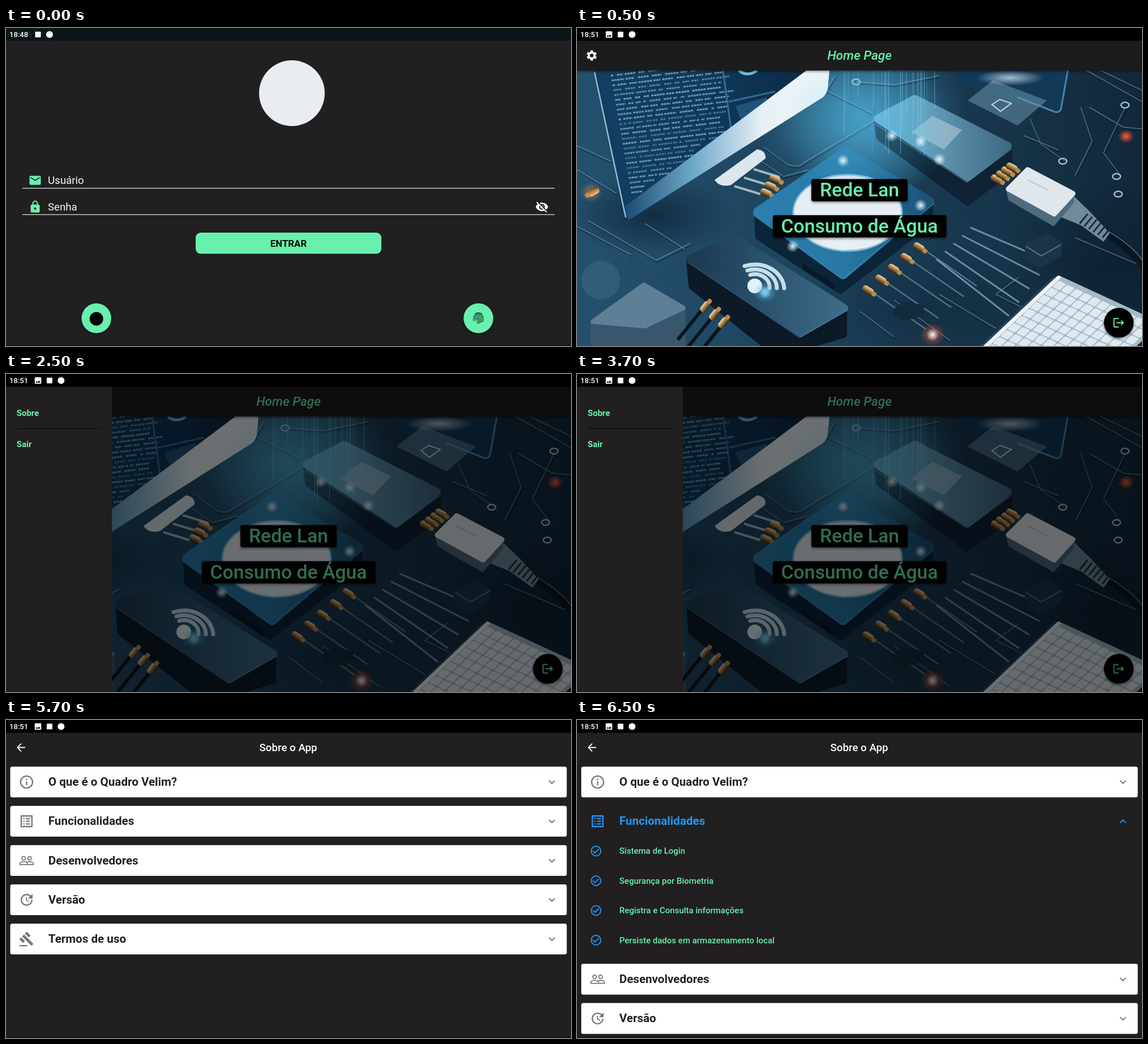
Write an HTML page that moves like this. It is 998x561 px and loops after 8 s.

```html
<!DOCTYPE html>
<html lang="pt">
<head>
<meta charset="utf-8">
<style>
html, body { margin: 0; width: 100%; height: 100%; overflow: hidden; background: #211f20; }
svg { display: block; width: 100%; height: 100%; }
text { font-family: Roboto, sans-serif; }
</style>
</head>
<body>
<svg id="stage" viewBox="0 0 998 561"></svg>
<script>
const GREEN = '#69f0ae', BLUE = '#2196f3', DARK = '#211f20';
const RING = 'M12 2C6.48 2 2 6.48 2 12s4.48 10 10 10 10-4.48 10-10S17.52 2 12 2zm0 18c-4.41 0-8-3.59-8-8s3.59-8 8-8 8 3.59 8 8-3.59 8-8 8z';
const ICONS = {
  mail: 'M20 4H4c-1.1 0-1.99.9-1.99 2L2 18c0 1.1.9 2 2 2h16c1.1 0 2-.9 2-2V6c0-1.1-.9-2-2-2zm0 4l-8 5-8-5V6l8 5 8-5v2z',
  lock: 'M18 8h-1V6c0-2.76-2.24-5-5-5S7 3.24 7 6v2H6c-1.1 0-2 .9-2 2v10c0 1.1.9 2 2 2h12c1.1 0 2-.9 2-2V10c0-1.1-.9-2-2-2zm-6 9c-1.1 0-2-.9-2-2s.9-2 2-2 2 .9 2 2-.9 2-2 2zm3.1-9H8.9V6c0-1.71 1.39-3.1 3.1-3.1 1.71 0 3.1 1.39 3.1 3.1v2z',
  hidden: 'M12 7c2.76 0 5 2.24 5 5 0 .65-.13 1.26-.36 1.83l2.92 2.92c1.51-1.26 2.7-2.89 3.43-4.75-1.73-4.39-6-7.5-11-7.5-1.4 0-2.74.25-3.98.7l2.16 2.16C10.74 7.13 11.35 7 12 7zM2 4.27l2.28 2.28.46.46C3.08 8.3 1.78 10.02 1 12c1.73 4.39 6 7.5 11 7.5 1.55 0 3.03-.3 4.38-.84l.42.42L19.73 22 21 20.73 3.27 3 2 4.27zM7.53 9.8l1.55 1.55c-.05.21-.08.43-.08.65 0 1.66 1.34 3 3 3 .22 0 .44-.03.65-.08l1.55 1.55c-.67.33-1.41.53-2.2.53-2.76 0-5-2.24-5-5 0-.79.2-1.53.53-2.2zm4.31-.78l3.15 3.15.02-.16c0-1.66-1.34-3-3-3l-.17.01z',
  gear: 'M19.14 12.94c.04-.3.06-.61.06-.94 0-.32-.02-.64-.07-.94l2.03-1.58c.18-.14.23-.41.12-.61l-1.92-3.32c-.12-.22-.37-.29-.59-.22l-2.39.96c-.5-.38-1.03-.7-1.62-.94l-.36-2.54c-.04-.24-.24-.41-.48-.41h-3.84c-.24 0-.43.17-.47.41l-.36 2.54c-.59.24-1.13.57-1.62.94l-2.39-.96c-.22-.08-.47 0-.59.22L2.74 8.87c-.12.21-.08.47.12.61l2.03 1.58c-.05.3-.09.63-.09.94s.02.64.07.94l-2.03 1.58c-.18.14-.23.41-.12.61l1.92 3.32c.12.22.37.29.59.22l2.39-.96c.5.38 1.03.7 1.62.94l.36 2.54c.05.24.24.41.48.41h3.84c.24 0 .44-.17.47-.41l.36-2.54c.59-.24 1.13-.56 1.62-.94l2.39.96c.22.08.47 0 .59-.22l1.92-3.32c.12-.22.07-.47-.12-.61l-2.01-1.58zM12 15.6c-1.98 0-3.6-1.62-3.6-3.6s1.62-3.6 3.6-3.6 3.6 1.62 3.6 3.6-1.62 3.6-3.6 3.6z',
  logout: 'M17 7l-1.41 1.41L18.17 11H8v2h10.17l-2.58 2.58L17 17l5-5zM4 5h8V3H4c-1.1 0-2 .9-2 2v14c0 1.1.9 2 2 2h8v-2H4V5z',
  back: 'M20 11H7.83l5.59-5.59L12 4l-8 8 8 8 1.41-1.41L7.83 13H20v-2z',
  info: 'M11 7h2v2h-2zm0 4h2v6h-2z' + RING,
  list: 'M19 5v14H5V5h14m1.1-2H3.9c-.5 0-.9.4-.9.9v16.2c0 .4.4.9.9.9h16.2c.4 0 .9-.5.9-.9V3.9c0-.5-.5-.9-.9-.9zM11 7h6v2h-6V7zm0 4h6v2h-6v-2zm0 4h6v2h-6zM7 7h2v2H7zm0 4h2v2H7zm0 4h2v2H7z',
  people: 'M16.5 13c-1.2 0-3.07.34-4.5 1-1.43-.67-3.3-1-4.5-1C5.33 13 1 14.08 1 16.25V19h22v-2.75c0-2.17-4.33-3.25-6.5-3.25zm-4 4.5h-10v-1.25c0-.54 2.56-1.75 5-1.75s5 1.21 5 1.75v1.25zm9 0H14v-1.25c0-.46-.2-.86-.52-1.22.88-.3 1.96-.53 3.02-.53 2.44 0 5 1.21 5 1.75v1.25zM7.5 12c1.93 0 3.5-1.57 3.5-3.5S9.43 5 7.5 5 4 6.57 4 8.5 5.57 12 7.5 12zm0-5.5c1.1 0 2 .9 2 2s-.9 2-2 2-2-.9-2-2 .9-2 2-2zm9 5.5c1.93 0 3.5-1.57 3.5-3.5S18.43 5 16.5 5 13 6.57 13 8.5s1.57 3.5 3.5 3.5zm0-5.5c1.1 0 2 .9 2 2s-.9 2-2 2-2-.9-2-2 .9-2 2-2z',
  update: 'M21 10.12h-6.78l2.74-2.82c-2.73-2.7-7.15-2.8-9.88-.1-2.73 2.71-2.73 7.08 0 9.79s7.15 2.71 9.88 0C18.32 15.65 19 14.08 19 12.1h2c0 1.98-.88 4.55-2.64 6.29-3.51 3.48-9.21 3.48-12.72 0-3.5-3.47-3.53-9.11-.02-12.58s9.14-3.47 12.65 0L21 3v7.12zM12.5 8v4.25l3.5 2.08-.72 1.21L11 13V8h1.5z',
  gavel: 'M1 21h12v2H1zM5.25 8.07l2.83-2.83 14.14 14.15-2.83 2.82zM12.32 1l5.65 5.66-2.83 2.83-5.65-5.66zM3.83 9.49l5.65 5.65-2.83 2.83L1 12.31z',
  more: 'M16.59 8.59L12 13.17 7.41 8.59 6 10l6 6 6-6z',
  less: 'M12 8l-6 6 1.41 1.41L12 10.83l4.59 4.58L18 14z',
  check: 'M16.59 7.58L10 14.17l-3.59-3.58L5 12l5 5 8-8z' + RING,
  image: 'M21 19V5c0-1.1-.9-2-2-2H5c-1.1 0-2 .9-2 2v14c0 1.1.9 2 2 2h14c1.1 0 2-.9 2-2zM8.5 13.5l2.5 3.01L14.5 12l4.5 6H5l3.5-4.5z'
};

const icon = (name, x, y, fill = '#fff', s = .936) =>
  `<path d="${ICONS[name]}" fill="${fill}" transform="translate(${x} ${y}) scale(${s}) translate(-12 -12)"/>`;
const text = (str, x, y, size, fill, weight = 500, more = '') =>
  `<text x="${x}" y="${y}" font-size="${size}" fill="${fill}" font-weight="${weight}" ${more}>${str}</text>`;
const rect = (x, y, w, h, fill, r = 0, more = '') =>
  `<rect x="${x}" y="${y}" width="${w}" height="${h}" rx="${r}" fill="${fill}" ${more}/>`;
const circle = (x, y, r, fill, more = '') => `<circle cx="${x}" cy="${y}" r="${r}" fill="${fill}" ${more}/>`;
const shape = (d, fill, more = '') => `<path d="${d}" fill="${fill}" ${more}/>`;
// Solid with softened corners
const slab = (pts, fill, w = 14) => shape(`M${pts}Z`, fill, `stroke="${fill}" stroke-width="${w}" stroke-linejoin="round"`);
const line = (d, color, w = 1, more = '') =>
  `<path d="${d}" fill="none" stroke="${color}" stroke-width="${w}" ${more}/>`;
const repeat = (n, fn) => Array.from({ length: n }, (_, i) => fn(i)).join('');
const MID = 'text-anchor="middle"', SHADOW = 'filter="url(#shadow)"';

let seed = 7;
const rnd = () => (seed = seed * 16807 % 2147483647) / 2147483647;

const linear = (id, colors, dir = 'x2="1" y2="0"') => `<linearGradient id="${id}" ${dir}>` +
  colors.map((c, i) => `<stop offset="${i / (colors.length - 1)}" stop-color="${c}"/>`).join('') + '</linearGradient>';
const radial = (id, color) =>
  `<radialGradient id="${id}"><stop stop-color="${color}"/><stop offset="1" stop-color="${color}" stop-opacity="0"/></radialGradient>`;
const defs = `<defs>
  ${linear('desk', ['#24506e', '#1c4059', '#12283a'])}
  ${linear('chin', ['#1b4d74', '#6fa9c9', '#e6f0f5', '#f4f8fa'])}
  ${linear('screen', ['#123f63', '#0f3a5c', '#0c2a45'])}
  ${linear('top', ['#6db4d2', '#5d93ad', '#3f6a84'])}
  ${linear('hub', ['#2b7fae', '#2878a5', '#1c5379'])}
  ${linear('low', ['#1c3a50', '#2c536e', '#3d6c89'])}
  ${linear('gold', ['#f0dcae', '#a5793c', '#33220f'], 'x2="0" y2="1"')}
  ${radial('cyan', '#55c2ef')}${radial('white', '#e2f6ff')}${radial('red', '#ff5a35')}
  ${radial('amber', '#f3a04c')}${radial('shade', '#061320')}
  <filter id="shadow" x="-20%" y="-20%" width="140%" height="150%">
    <feDropShadow dx="0" dy="2" stdDeviation="2" flood-opacity=".5"/></filter></defs>`;

const glow = (x, y, rx, ry, id, o = 1) =>
  `<ellipse cx="${x}" cy="${y}" rx="${rx}" ry="${ry}" fill="url(#${id})" opacity="${o}"/>`;

function statusBar(time, icons, fill) {
  const draw = {
    image: x => icon('image', x, 11.5, '#fff', .64),
    square: x => rect(x - 5, 6.5, 10, 10, '#fff', 1),
    dot: x => circle(x, 11.5, 6, '#fff')
  };
  return rect(0, 0, 998, 22.5, fill) + text(time, 6, 16, 13.1, '#fff') +
    icons.map((k, i) => draw[k](56.5 + i * 20.4)).join('');
}

function fingerprint(x, y) {
  const arcs = [2, 4.2, 6.4, 8.6].map((r, i) =>
    `M${-r} ${3 + i % 2 * 2}V0A${r} ${r} 0 0 1 ${r} 0Q${r} ${4 + i} ${r - 1.6} ${9.5 - i * 1.3}`).join('');
  return line(arcs + 'M0 0Q0 6 -3 9M-6 -8Q0 -11.5 6 -8', '#17382a', 1.1,
    `stroke-linecap="round" transform="translate(${x} ${y})"`);
}

function login() {
  const field = (name, label, y) => icon(name, 51.5, y - .2, GREEN, 1) +
    text(label, 74, y + 6.3, 18.7, '#f4f4f4', 400) + rect(29, y + 13, 940, 1.3, '#d8d8d8');
  return rect(0, 0, 998, 561, DARK) + statusBar('18:48', ['square', 'dot'], '#0b1619') +
    circle(505, 115, 58, '#e9edf2') +
    field('mail', 'Usuário', 269) + field('lock', 'Senha', 315.6) + icon('hidden', 946.7, 315.6, '#fff', 1) +
    rect(335, 361, 328, 37.3, GREEN, 9) + text('ENTRAR', 499, 386, 16.85, '#0a0a0a', 700, MID) +
    circle(159.7, 512, 26.2, GREEN, SHADOW) + circle(159.7, 513, 12, '#000') +
    circle(834.5, 512, 26.2, GREEN, SHADOW) + fingerprint(834.5, 512) +
    rect(0, 560, 998, 1, '#111');
}

function monitors() {
  const code = repeat(25, r => {
    const y = 84 + r * 8.6, x = 60 + r * 1.5, end = 252 - Math.max(0, r - 14) * 15;
    let d = '';
    for (let p = x; p < end;) {
      const w = 4 + rnd() * 22;
      d += `M${p} ${y - (p - x) * .12}l${w} ${-w * .12}`;
      p += w + 2 + rnd() * 5;
    }
    return line(d, '#9fcbe2', 3, `opacity="${.35 + rnd() * .35}" stroke-dasharray="4 1"`);
  });
  return shape('M30 75H446L443 116L92 338Q86 339 84 332Z', '#123d60') +
    shape('M40 75H410L90 312Z', 'url(#screen)') + code +
    line('M258 75L272 178M268 130L350 112', '#2f6e98', 3) +
    shape('M280 138l55-16 3 18-47 26z', '#2a6a95', 'opacity=".6"') +
    line('M286 75q14 12 32 0', '#78bfe0', 5) +
    shape('M86 314L405 75H446L443 108Q440 120 430 125L94 337Q88 338 86 330Z', 'url(#chin)') +
    line('M31 78L86 334', '#8fbdd5', 2.5) +
    shape('M243 268L318 214Q334 216 333 230L272 277Q252 282 243 268Z', '#dbe6ed') +
    shape('M668 75H868L856 142Q853 151 844 149L690 100Z', '#123958') +
    line('M867 75L855 142Q853 150 844 148L778 122', '#4d86a8', 3) +
    shape('M690 128L735 92L830 128L778 172Z', '#6993aa', 'opacity=".55"') +
    glow(765, 88, 60, 14, 'white', .7) +
    line('M733 135l14-9 20 7-19 14z', '#c5dce8', 2);
}

function traces() {
  const paths = 'M455 85L440 110 520 150M493 95L560 100 640 84M330 210L370 240Q390 248 400 238L530 160' +
    'M310 225L365 262 410 250M0 208L60 235M0 250L70 292M20 340L140 410 200 380M0 350L95 400' +
    'M120 345L190 390M862 235L820 205 800 160M890 140L910 200 880 260M905 140L965 175 998 178' +
    'M968 140L930 220 960 260M790 190L850 215M640 470L740 530M560 480L660 552M500 500L560 545' +
    'M780 440L740 470 800 500M880 370L998 420M900 75L998 130M925 75L998 110';
  return line(paths, '#091a28', 3, 'opacity=".35" stroke-linejoin="round" transform="translate(2 3)"') +
    line(paths, '#91b8cf', 1.5, 'opacity=".5" stroke-linejoin="round"') +
    repeat(5, i => line(`M${695 - i * 15} ${352 + i * 14}L${835 - i * 18} ${412 + i * 24}`, '#91b3c7', 3, 'opacity=".7"')) +
    [[493, 95], [858, 235], [953, 262], [956, 293], [968, 136]].map(([x, y]) =>
      `<ellipse cx="${x}" cy="${y}" rx="7" ry="5" fill="none" stroke="#9dc0d5" stroke-width="2.5"/>`).join('');
}

const plug = (x, y, turn) => `<g transform="translate(${x} ${y}) rotate(${turn})">` +
  rect(-13, -6, 21, 12, 'url(#gold)', 5) + rect(6, -4, 8, 8, '#b98b4e', 3) + '</g>';

function boxes() {
  const edge = 'opacity=".5" stroke-linejoin="round"';
  const top = slab('532 165L535 192L690 306L762 252L762 212L690 262Z', '#0f2334') +
    slab('531 160L597 125L761 208L690 263Z', 'url(#top)') + line('M525 168L689 272L768 213', '#7db2cd', 1.5, edge) +
    shape('M628 155L680 180L648 214L590 184Z', '#b9d0dc', 'opacity=".55"') +
    repeat(4, i => plug(743 + i * 9, 268 - i * 7, 28));
  const hub = slab('320 330L322 368L465 462L622 342L622 308Z', '#0c2438') +
    slab('320 325L474 219L622 306L470 434Z', 'url(#hub)', 18) + line('M312 331L469 443L631 309', '#4f9cc6', 1.5, edge) +
    '<ellipse cx="478" cy="326" rx="96" ry="67" fill="#e6eef3" stroke="#86bfdc" stroke-width="3"/>' +
    shape('M398 415L455 452V463L398 425Z', '#071a2c') +
    repeat(5, i => line(`M${526 + i * 22.5} ${469 - i * 19}l90 62`, '#7d9fb3', 2.5, 'opacity=".6"') +
      plug(516 + i * 22.5, 464 - i * 19, 32));
  const low = slab('200 410L204 455L330 556L400 561L470 540V496Z', '#0c1a27') +
    slab('200 407L276 371L472 494L395 538Z', 'url(#low)') + line('M194 412L393 546L479 497', '#5c93b4', 1.5, edge) +
    circle(314, 455, 13, '#e3f1f8') +
    [26, 39, 52].map((r, i) => line(`M${306 - i * 5} ${455 - r * .75 + i * 2}A${r} ${r * .86} 0 0 1 ${314 + r} 459`,
      '#c4deeb', 7, 'stroke-linecap="round"')).join('');
  const cube = slab('28 520L118 455L188 493V570H28Z', '#38566c', 8) +
    slab('28 518L118 453L188 494L120 526Z', '#5f7f95', 8) +
    repeat(3, i => line(`M${220 + i * 18} ${498 + i * 13}l-42 52`, '#0b151e', 6) + plug(228 + i * 16, 490 + i * 14, -52));
  return top + hub + low + cube;
}

function adapter() {
  return line('M915 348Q985 390 1004 428', '#0a1620', 14) + line('M938 358Q984 386 1002 414', '#4a687c', 2) +
    shape('M846 330L877 296L908 326L941 362L930 377L890 348Z', '#70899b') +
    repeat(6, i => line(`M${888 + i * 8} ${345 + i * 5}l14-17`, '#1a2d3c', 3)) +
    shape('M758 286L844 330L878 296V308L842 350L762 304Z', '#4e6a7d') +
    slab('762 284L796 250L876 292L843 328Z', '#dfe7ec', 9) + line('M796 268l36 18', '#b9c8d2', 2);
}

function keyboard() {
  const keys = repeat(10, r => repeat(11, c => rect(8 + c * 17, 9 + r * 18, 15, 16, '#dfe9ef', 3)));
  return `<g transform="matrix(.91 .42 -.73 .69 850 436)">` +
    rect(-4, 4, 200, 240, '#27465b', 8) + rect(0, 0, 200, 240, '#a3bac8', 8) +
    rect(0, 0, 7, 240, '#edf3f6', 3) + keys + '</g>';
}

function photo() {
  const sparks = [[470, 234], [556, 190], [607, 200], [607, 313], [381, 385], [640, 232], [332, 466], [470, 385]];
  return rect(0, 75, 998, 486, 'url(#desk)') +
    glow(130, 330, 150, 70, 'shade', .55) + glow(930, 420, 180, 160, 'shade', .4) +
    glow(600, 500, 230, 110, 'shade', .3) + glow(500, 150, 190, 150, 'cyan', .55) +
    traces() + monitors() +
    repeat(3, i => line(`M${278 + i * 17} ${279 - i * 15}l46 14`, '#9db8c9', 4) + plug(336 + i * 8, 292 - i * 12, 25)) +
    boxes() + glow(510, 175, 150, 140, 'cyan', .45) +
    repeat(24, () => line(`M${468 + rnd() * 165} 75v${40 + rnd() * 125}`, '#8addff', 1.2, `opacity="${.15 + rnd() * .35}"`)) +
    sparks.map(([x, y]) => glow(x, y, 11, 11, 'white')).join('') + glow(332, 466, 22, 18, 'cyan', .7) +
    adapter() +
    slab('798 385L830 370L850 382L848 398L818 416L798 402Z', '#1c3446') + line('M793 385L820 402L855 382', '#55788f', 2) +
    slab('562 497L580 485L610 492V504L580 514L562 506Z', '#142b3c', 6) +
    circle(42, 445, 34, '#6f93a8', 'opacity=".2"') +
    keyboard() + plug(27, 290, 150) + glow(25, 290, 20, 18, 'amber', .5) +
    glow(970, 191, 14, 12, 'red') + glow(628, 541, 22, 20, 'red', .7) + glow(628, 541, 11, 11, 'white');
}

function home() {
  const button = (label, x, y, w) => rect(x, y, w, 39.3, '#000', 4, SHADOW) +
    text(label, 499, y + 30.9, 33.7, GREEN, 500, MID);
  return photo() + rect(0, 22, 998, 52.7, '#1a1a1a', 0, SHADOW) + icon('gear', 26, 48.5) +
    text('Home Page', 499, 55.7, 22.46, GREEN, 500, MID + ' font-style="italic"') +
    button('Rede Lan', 414, 266.5, 170) + button('Consumo de Água', 346, 330.2, 306.5) +
    circle(957, 520, 26.2, '#000', SHADOW) + icon('logout', 957, 520, GREEN);
}

const drawer = () => rect(0, 0, 998, 561, '#000', 0, 'opacity=".54"') + rect(0, 22, 187, 539, DARK) +
  text('Sobre', 18.7, 74.3, 15, GREEN, 700) + text('Sair', 18.7, 129, 15, GREEN, 700) +
  rect(18.7, 95.8, 149.5, 1, '#0c0b0c');

function about(open) {
  const row = (name, label, y, active) => {
    const tint = active ? BLUE : '#757575';
    return (active ? '' : rect(7.5, y, 983, 54.4, '#fff', 3.5)) + icon(name, 36.4, y + 27.2, tint, 1.17) +
      text(label, 74.8, y + 33.8, 20.6, active ? BLUE : '#212121', 700) +
      icon(active ? 'less' : 'more', 964.3, y + 27.3, tint);
  };
  const rows = [['info', 'O que é o Quadro Velim?'], ['list', 'Funcionalidades'], ['people', 'Desenvolvedores'],
    ['update', 'Versão'], ['gavel', 'Termos de uso']];
  const items = ['Sistema de Login', 'Segurança por Biometria', 'Registra e Consulta informações', 'Persiste dados em armazenamento local'];
  return rect(0, 0, 998, 561, DARK) + icon('back', 26.2, 48.5) +
    text('Sobre o App', 498.5, 55.3, 18.7, '#fff', 500, MID) +
    rows.map(([name, label], i) => row(name, label, 82.2 + i * 69.25 + (open && i > 1 ? 209.4 : 0), open && i === 1)).join('') +
    (open ? items.map((s, i) => icon('check', 33.6, 231.2 + i * 52.4, BLUE) +
      text(s, 74.8, 236.3 + i * 52.4, 15, GREEN)).join('') : '') +
    rect(0, 560, 998, 1, '#111');
}

const layers = {
  login: login(), home: home(), drawer: drawer(), about: about(false), features: about(true),
  bar: statusBar('18:51', ['image', 'square', 'dot'], '#000')
};
const timeline = [
  [0, ['login']],
  [500, ['home', 'bar']],
  [2500, ['home', 'drawer', 'bar']],
  [4500, ['about', 'bar']],
  [6500, ['features', 'bar']]
];
const stage = document.getElementById('stage');
stage.innerHTML = defs + Object.entries(layers).map(([id, body]) => `<g id="${id}">${body}</g>`).join('');
const groups = Object.keys(layers).map(id => document.getElementById(id));

function tick() {
  const t = performance.now() % 8000;
  const [, shown] = timeline.findLast(([start]) => t >= start);
  for (const g of groups) g.style.display = shown.includes(g.id) ? '' : 'none';
  requestAnimationFrame(tick);
}
tick();
</script>
</body>
</html>
```
